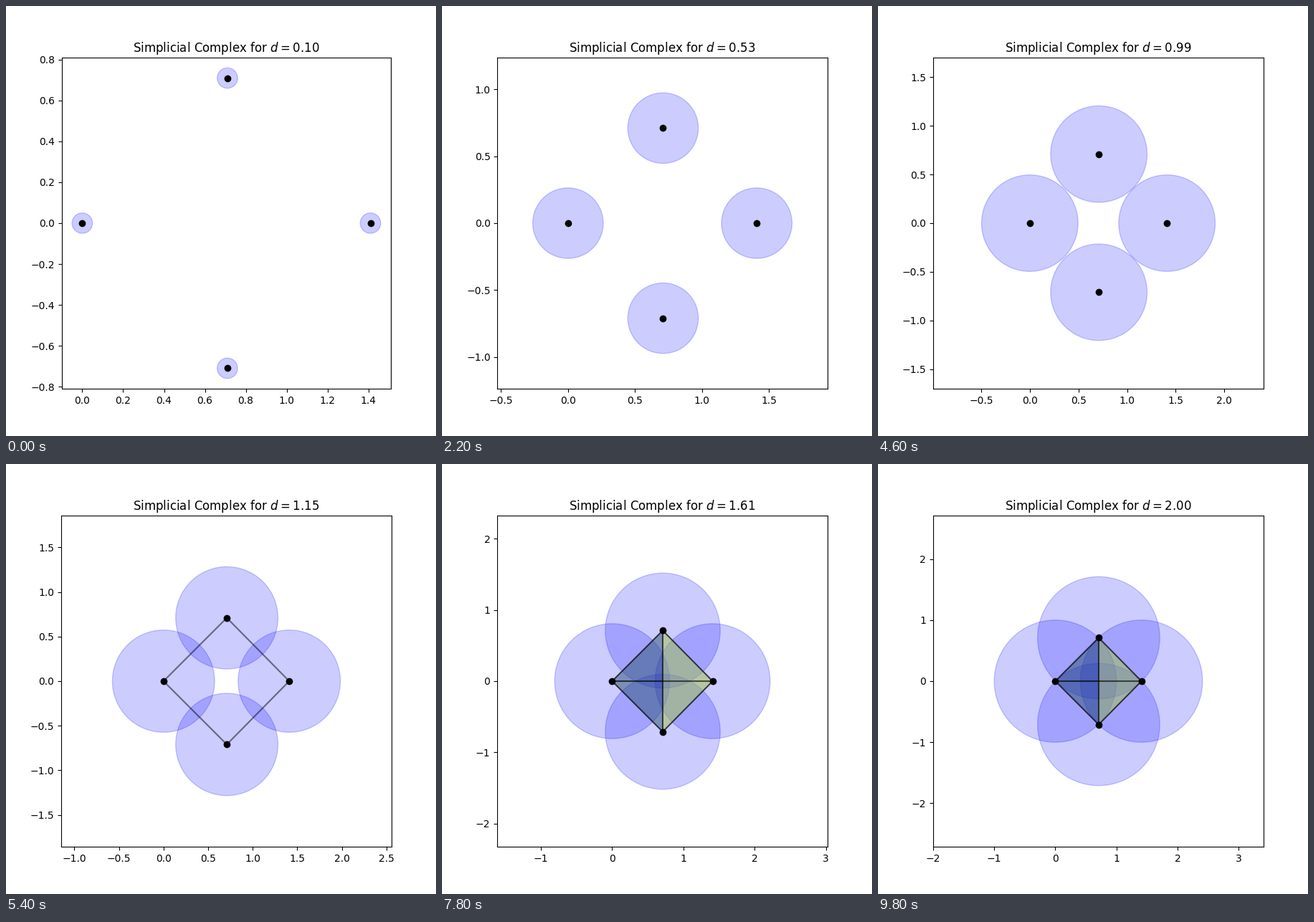
These frames come from a looping animation (600 by 600 pixels, 10 s). A matplotlib script:

```python
from itertools import combinations

import matplotlib.pyplot as plt
import numpy as np
from matplotlib.animation import FuncAnimation

FRAMES = 50
INTERVAL = 200
POINTS = np.array([(0, 0), (0.71, 0.71), (0.71, -0.71), (1.41, 0)])
DISTANCES = np.linspace(0.1, 2.0, FRAMES)
# Mean x of the leftmost and rightmost triangle.
X_LOW, X_HIGH = POINTS[:3, 0].mean(), POINTS[1:, 0].mean()

fig, ax = plt.subplots(figsize=(6, 6), dpi=100)


def simplices(size, d):
    """Vertex groups whose pairwise distances are all at most d."""
    for group in combinations(range(len(POINTS)), size):
        pts = POINTS[list(group)]
        if all(np.hypot(*(p - q)) <= d for p, q in combinations(pts, 2)):
            yield pts


def face_color(pts):
    # Faces are shaded from left to right by their mean x.
    level = (pts[:, 0].mean() - X_LOW) / (X_HIGH - X_LOW)
    return plt.cm.viridis(float(np.clip(level, 0, 1)), alpha=0.3)


def draw(i):
    d = DISTANCES[i]
    ax.clear()
    for p in POINTS:
        ax.add_patch(plt.Circle(p, d / 2, color="blue", alpha=0.2))
    for pts in simplices(3, d):
        ax.add_patch(plt.Polygon(pts, facecolor=face_color(pts),
                                 edgecolor=(0, 0, 0, 0.3), linewidth=1))
    for pts in simplices(2, d):
        ax.plot(pts[:, 0], pts[:, 1], "k-", alpha=0.5)
    ax.plot(POINTS[:, 0], POINTS[:, 1], "ko", zorder=3)

    (x0, y0), (x1, y1) = POINTS.min(axis=0) - d, POINTS.max(axis=0) + d
    ax.set_xlim(x0, x1)
    ax.set_ylim(y0, y1)
    ax.set_aspect("equal")
    ax.set_title(f"Simplicial Complex for $d = {d:.2f}$")
    return []


anim = FuncAnimation(fig, draw, frames=FRAMES, interval=INTERVAL,
                     repeat=True, repeat_delay=0)
plt.show()
```
